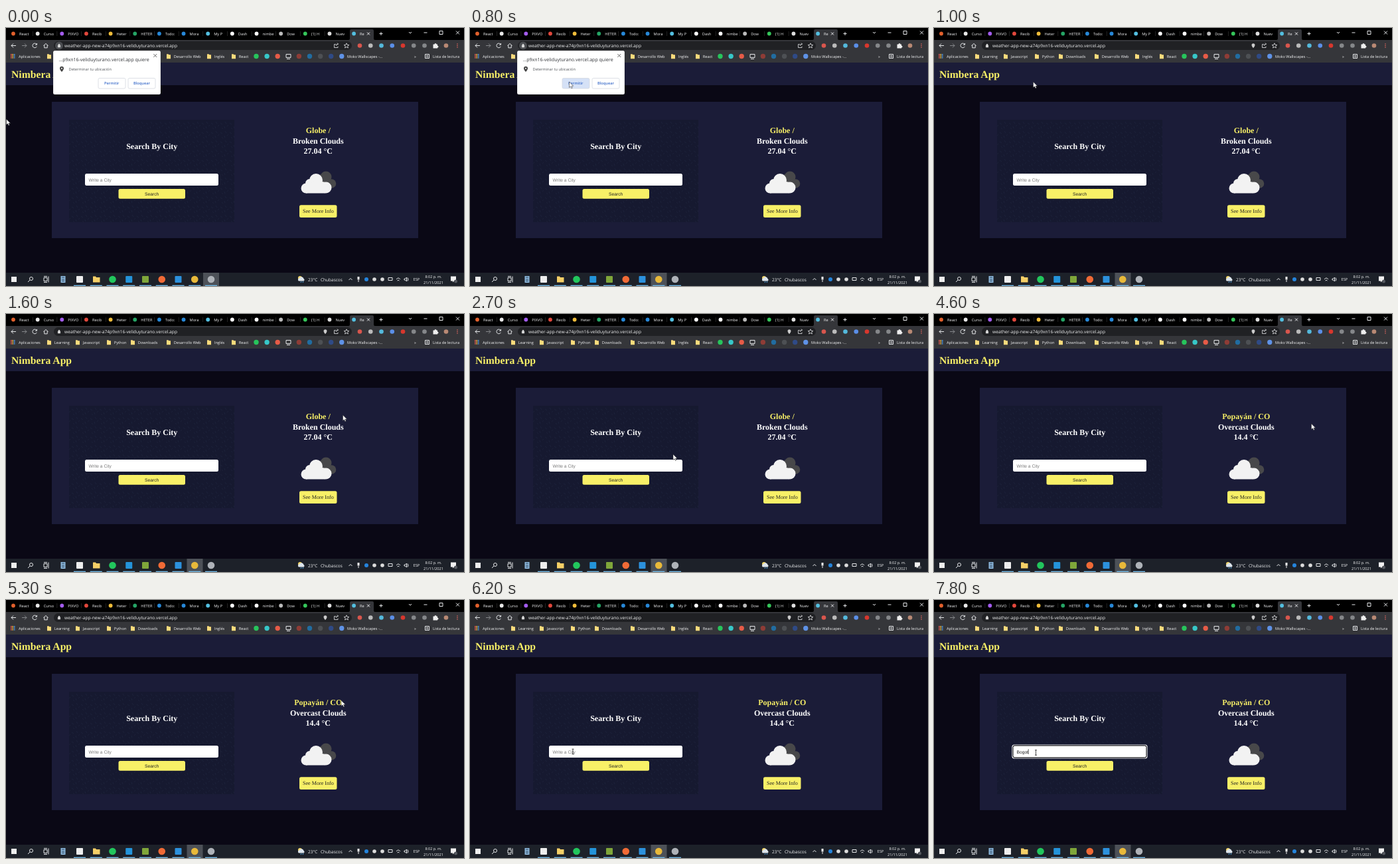
Recreate the animation shown at these times as an HTML page. Size 690 by 388 pixels, loop 8 s.

```html
<!DOCTYPE html>
<html lang="es">
<head>
<meta charset="utf-8">
<title>Nimbera App</title>
<style>
html, body { margin: 0; width: 100%; height: 100%; overflow: hidden; background: #0a0815; }
svg { display: block; width: 100vw; height: 100vh; }
text { font-family: "Open Sans", "Noto Sans", sans-serif; font-size: 5.7px; fill: #f2f3f4; text-rendering: geometricPrecision; white-space: pre; }
.serif { font: bold 12px "Liberation Serif", serif; fill: #fff; text-anchor: middle; }
.arial { font: 6.7px "Liberation Sans", sans-serif; fill: #222; }
.yellow { fill: #f8f067; }
.line { fill: none; stroke: #e6e8ea; stroke-width: 1; }
.action { font-weight: 600; fill: #3f6fca; text-anchor: middle; }
</style>
</head>
<body>
<svg viewBox="0 0 690 388" preserveAspectRatio="none">
  <defs>
    <pattern id="weave" width="14" height="14" patternUnits="userSpaceOnUse">
      <path d="M1 3l3 2M8 1l2 3M11 8l2-2M3 10l2 2M7 8l1 3" stroke="#1e233b" stroke-width=".8" fill="none"/>
    </pattern>
    <path id="folder" d="M-3-3.300h2.500l1 1h2.500v6h-6z" fill="#fbdc7c"/>
  </defs>

  <rect width="690" height="388" fill="#0a0815"/>
  <rect y="51" width="690" height="35" fill="#1b1c38"/>
  <text class="serif yellow" x="8" y="74.5" style="font-size:15.7px;text-anchor:start">Nimbera App</text>
  <rect x="69" y="111" width="552" height="205" fill="#1b1c38"/>
  <rect x="95" y="138" width="249" height="154" fill="#161930"/>
  <rect x="95" y="138" width="249" height="154" fill="url(#weave)"/>

  <text class="serif" x="219.700" y="182">Search By City</text>
  <rect id="ring" x="118" y="218" width="203" height="20" rx="3" fill="none" stroke="#fff" stroke-width="1.2"/>
  <rect id="field" x="119" y="219" width="201" height="18" rx="2.5" fill="#fff" stroke="#111"/>
  <text id="entry" class="arial" x="124.5" y="230.5"></text>
  <rect id="caret" y="224.3" width=".7" height="7.5" fill="#111"/>
  <rect class="yellow" x="169.5" y="242" width="100.5" height="14.700" rx="2.5"/>
  <text class="arial" x="219.7" y="251.8" text-anchor="middle">Search</text>

  <text id="place" class="serif yellow" x="470.3" y="158"></text>
  <text id="sky" class="serif" x="470.3" y="173.7"></text>
  <text id="degrees" class="serif" x="470.3" y="189.3"></text>
  <g fill="#48484a">
    <circle cx="482" cy="224" r="8.500"/><circle cx="475" cy="226" r="6"/><circle cx="490.500" cy="234" r="6.800"/>
    <path d="M475 226h14v14.800h-14z"/>
  </g>
  <g fill="#f2f2f2">
    <circle cx="452" cy="241" r="7.500"/><circle cx="457.500" cy="233.500" r="6.500"/>
    <circle cx="467" cy="229" r="10"/><circle cx="482" cy="240" r="8.500"/>
    <path d="M452 236l15-7 14 3v16.500h-29z"/>
  </g>
  <rect class="yellow" x="442" y="266.300" width="56.500" height="18.700" rx="2.5"/>
  <text class="serif" x="470.4" y="278.4" style="font-size:8.1px;font-weight:400;fill:#222">See More Info</text>

  <g id="browser">
    <rect width="690" height="18" fill="#000"/>
    <path d="M516 18q2 0 2-2V4q0-2 2-2h32q2 0 2 2v12q0 2 2 2z" fill="#35363a"/>
    <rect y="18" width="690" height="34" fill="#35363a"/>
    <rect x="72" y="20" width="449" height="13" rx="6.5" fill="#202124"/>
    <g class="line">
      <path d="M544 6.5l4 4m0-4l-4 4M562.500 8.500h5m-2.500-2.500v5M607 6l2 2 2-2M629.500 7h5M653 4.500h5v5h-5zM678 4.500l5 5m0-5l-5 5"/>
      <path d="M15 26.500H8m3-3-3 3 3 3"/>
      <path d="M24 26.500h7m-3-3 3 3-3 3" stroke="#85878a"/>
      <path d="M46 24.500a3.300 3.300 0 1 0 .3 3.300M46.500 23v2.200h-2.300M56.500 26.500l3.500-3 3.500 3M57.800 26v3.800h4.400V26"/>
      <path d="M497 24.500h-2.500v5h5.500v-2M497 27q0-3 3.500-3m-1.500-1.500 1.500 1.500-1.500 1.500M513 22.800l1.100 2.500 2.700.2-2.100 1.800.7 2.700-2.400-1.500-2.400 1.500.7-2.700-2.100-1.800 2.700-.2z" stroke-width=".8"/>
    </g>
    <path d="M643.500 24.500h2a1.500 1.500 0 0 1 3 0h1.500v2a1.500 1.500 0 0 1 0 3v1h-6.500z" fill="#eee"/>
    <circle id="siteInfo" cx="80" cy="26.500" r="6" fill="#4b4d51"/>
    <path d="M78.200 25.800h3.600v3.300h-3.600zM79 26v-1a1 1 0 0 1 2 0v1" fill="#ddd" stroke="#ddd" stroke-width=".4"/>
    <path id="pin" d="M481 30.300q-2.500-3-2.500-4.500a2.500 2.500 0 0 1 5 0q0 1.500-2.500 4.500z" fill="#ccc"/>
    <text x="88" y="28.800" style="font-size:6.68px">weather-app-new-a74p9xn16-veliduyturano.vercel.app</text>
    <path d="M422 39.500h7v5h-7zM423 46.500h5M631.500 39.500h6v6h-6zM633 41.500h3m-3 2h3" class="line"/>
    <text x="615" y="44.800">»</text>
    <text x="643" y="44.600">Lista de lectura</text>
    <text x="514" y="44.600">Moko Wallscapes -...</text>
  </g>

  <g id="taskbar">
    <rect y="368" width="690" height="20" fill="#1d2129"/>
    <rect id="active" y="368" width="24" height="20" fill="#4d5158"/>
    <g class="line">
      <circle cx="38" cy="377" r="2.500"/><path d="M36 379l-3 3M57 375.500h5v5h-5zM57 373.500h5M57 382.500h5M64 373.500v9"/>
      <path d="M516.500 379l2.500-2.500 2.500 2.500M576 375.500h6v4h-6zM588 378q3-4 6 0M589.500 380q1.500-2 3 0M600 377h1.500l2-2v6l-2-2H600zM605 375.500q2 2.500 0 5"/>
    </g>
    <path d="M529.500 374h3v4.500h-3zM530.500 379h1v3h-1zM670 373.500h8v7h-3l-2 2v-2h-3z" fill="#f2f2f2"/>
    <circle cx="677.500" cy="381" r="2.500" fill="#55585f"/>
    <rect x="82.500" y="373" width="7" height="10" fill="#8fbbe0"/>
    <path d="M84 375h4M84 378h4M84 380.500h4" stroke="#263a50"/>
    <path d="M131 373.500h4l1 1.500h5.500v7.500H131z" fill="#f5cf67"/>
    <circle cx="443" cy="376" r="3" fill="#f4d76b"/>
    <path d="M441 380.500a2.500 2.500 0 0 1 1-4.500 3.500 3.500 0 0 1 6.500 1 2 2 0 0 1 0 3.500z" fill="#dce4ec"/>
    <path d="M445 381l-1 2m4-2-1 2" stroke="#4ea7e8"/>
    <text x="455" y="380.500" style="font-size:6.500px">23°C</text>
    <text x="474" y="380.500" style="font-size:6.500px">Chubascos</text>
    <text x="613.500" y="380">ESP</text>
    <text x="644" y="375.700" text-anchor="middle" style="font-size:5.500px">8:02 p. m.</text>
    <text x="644" y="385" text-anchor="middle">21/11/2021</text>
  </g>

  <g id="popup">
    <rect x="71" y="34" width="162" height="66" rx="2.500" fill="#fff" stroke="#0005" stroke-width=".5"/>
    <text x="79.500" y="50.400" style="font-size:7.050px;fill:#303236">...p9xn16-veliduyturano.vercel.app quiere</text>
    <path d="M222.300 39l5 5m0-5l-5 5" stroke="#555" stroke-width=".9"/>
    <path d="M84 66q-3-3.500-3-5.300a3 3 0 0 1 6 0q0 1.800-3 5.300z" fill="#444"/>
    <circle cx="84" cy="60.700" r="1" fill="#fff"/>
    <text x="94.500" y="64.200" style="fill:#55585c">Determinar tu ubicación</text>
    <g fill="#fff" stroke="#d5d9e0" stroke-width=".8">
      <rect id="allow" x="139" y="75.500" width="41" height="15.500" rx="2"/>
      <rect x="184" y="75.500" width="41" height="15.500" rx="2"/>
    </g>
    <text class="action" x="159.300" y="85.400">Permitir</text>
    <text class="action" x="204.500" y="85.400">Bloquear</text>
  </g>

  <path id="arrow" d="M0 0V8.500L2 6.700 3.400 9.700 4.800 9.100 3.500 6.200H6.200Z" fill="#fff" stroke="#222" stroke-width=".5"/>
  <path id="beam" d="M-1.500-3.800H1.500M0-3.800V3.800M-1.500 3.800H1.500" stroke="#222" stroke-width=".8"/>
</svg>
<script>
const $ = id => document.getElementById(id);
const browser = $('browser'), taskbar = $('taskbar');

function add(parent, tag, attrs, label = '') {
  const node = document.createElementNS('http://www.w3.org/2000/svg', tag);
  for (const name in attrs) node.setAttribute(name, attrs[name]);
  node.textContent = label;
  return parent.appendChild(node);
}
const dot = (parent, cx, cy, r, fill) => add(parent, 'circle', { cx, cy, r, fill });

const tabs = [
  ['React', '#e2602c'], ['Curso', '#e8e8e8'], ['PIXVO', '#a45cf0'], ['Recib', '#e2473c'],
  ['Heter', '#f0bd3a'], ['HETER', '#25a565'], ['Todo:', '#2788d8'], ['Mora', '#2788d8'],
  ['My P', '#53bfe0'], ['Dash', '#fff'], ['nimbe', '#fff'], ['Dow', '#bbb'],
  ['(1) H', '#35c65a'], ['Nuev', '#ddd'], ['Re', '#53bfe0']
];
tabs.forEach(([label, color], i) => {
  const x = 11 + i * 36.65;
  dot(browser, x, 8.5, 2.9, color);
  add(browser, 'text', { x: x + 9, y: 10.7 }, label);
  if (i < 13) add(browser, 'rect', { x: x + 29, y: 5, width: .5, height: 7, fill: '#444' });
});

const extensions = ['#d9564d', '#bbb', '#54b9dc', '#5b8fe8', '#d8372d', '#85878a', '#85878a', null, '#b98974'];
extensions.forEach((color, i) => color && dot(browser, 533 + i * 16.25, 26.5, 3.3, color));
for (const y of [24, 26.5, 29]) dot(browser, 680, y, .8, '#e8685e');

for (let i = 0; i < 9; i++)
  add(browser, 'rect', {
    x: 7 + i % 3 * 2.4, y: 39 + Math.floor(i / 3) * 2.4, width: 1.7, height: 1.7,
    fill: ['#e45b4f', '#efb83d', '#4d9ae8'][i % 3]
  });
add(browser, 'text', { x: 19, y: 44.6 }, 'Aplicaciones');
const folders = [
  ['Learning', 65], ['Javascript', 108], ['Python', 155], ['Downloads', 191],
  ['Desarrollo Web', 245], ['Inglés', 306], ['React', 343]
];
for (const [label, x] of folders) {
  add(browser, 'use', { href: '#folder', x, y: 42.5 });
  add(browser, 'text', { x: x + 7.8, y: 44.6 }, label);
}
const marks = ['#27c45c', '#37c7c8', '#e65b47', null, '#8e3c36', '#216ca0', '#4d5054', '#2f4a86', '#5f92e6'];
marks.forEach((color, i) => color && dot(browser, 377 + i * 16.1, 42.5, 3.7, color));

add(taskbar, 'rect', { x: 8, y: 374, width: 8, height: 8, fill: '#eee' });
const apps = ['#eee', null, '#22c65d', '#2494da', '#7fa63a', '#f06a36', '#2c91dd', '#e9b93a', '#aeb2b8'];
apps.forEach((color, i) => {
  const x = 111 + i * 24.75;
  if (color && [0, 3, 4, 6].includes(i))
    add(taskbar, 'rect', { x: x - 5, y: 373, width: 10, height: 10, rx: 1, fill: color });
  else if (color) dot(taskbar, x, 378, 5.3, color);
  add(taskbar, 'rect', { x: x - 9, y: 386.7, width: 18, height: 1.3, fill: '#71b8e6' });
});
dot(taskbar, 543, 378, 3, '#2584dc');
dot(taskbar, 555, 378, 2.8, '#ddd');
dot(taskbar, 567, 378, 2.8, '#ddd');

// Pointer stops: time, x, y
const stops = [
  [0, .5, 137], [100, .5, 137], [700, 149.5, 81], [1000, 149.5, 81], [1500, 507.5, 152],
  [2100, 507.5, 152], [2700, 306, 211], [3200, 42, 26], [3700, 42, 26], [4400, 568.5, 165],
  [4800, 568.5, 165], [5400, 500, 150], [6000, 155, 228], [6300, 155, 228], [6700, 153.5, 229.5]
];
function pointer(t) {
  const next = stops.findIndex(s => s[0] > t);
  if (next < 0) return stops[stops.length - 1].slice(1);
  const [t0, x0, y0] = stops[next - 1], [t1, x1, y1] = stops[next];
  const p = (t - t0) / (t1 - t0), k = p * p * (3 - 2 * p);
  return [x0 + (x1 - x0) * k, y0 + (y1 - y0) * k];
}

const show = (id, on) => $(id).style.display = on ? '' : 'none';
const write = (id, value) => { if ($(id).textContent !== value) $(id).textContent = value; };

function draw(t) {
  const asking = t < 1000, located = t >= 3500, focused = t >= 6300;
  show('popup', asking);
  show('siteInfo', asking);
  show('pin', !asking);
  $('allow').setAttribute('fill', t >= 700 ? '#d5e1f6' : '#fff');
  $('active').setAttribute('x', t < 700 ? 297 : 272.5);

  write('place', located ? 'Popayán / CO' : 'Globe /');
  write('sky', located ? 'Overcast Clouds' : 'Broken Clouds');
  write('degrees', located ? '14.4 °C' : '27.04 °C');

  const count = t < 7300 ? 0 : t < 7500 ? 1 : Math.min(5, 2 + Math.floor((t - 7500) / 100));
  write('entry', count ? 'Bogot'.slice(0, count) : 'Write a City');
  $('entry').style.fill = count ? '#222' : '#777';
  show('ring', focused);
  $('field').setAttribute('stroke-width', focused ? 1 : 0);
  show('caret', focused && (t < 6800 || t >= 7300));
  $('caret').setAttribute('x', 124.3 + (count ? $('entry').getComputedTextLength() : 0));

  const [x, y] = pointer(t);
  const inField = x > 119 && x < 320 && y > 219 && y < 237;
  show('arrow', !inField);
  show('beam', inField);
  $(inField ? 'beam' : 'arrow').setAttribute('transform', `translate(${x} ${y})`);
}

const start = performance.now();
function tick() {
  const t = (performance.now() - start) % 8000;
  draw(Math.floor(t / 100) * 100);
  requestAnimationFrame(tick);
}
tick();
</script>
</body>
</html>
```
